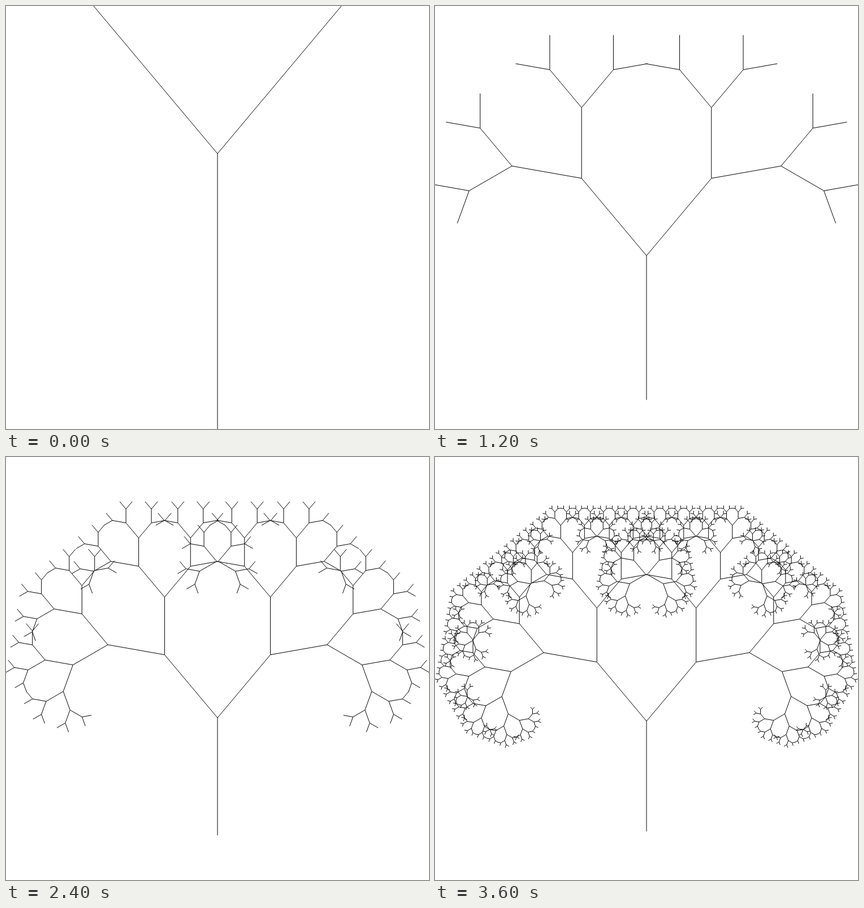
Recreate the animation shown at these times as an HTML page with a canvas. Size 748 by 748 pixels, loop 4 s.

```html
<!DOCTYPE html>
<html lang="en">
<head>
<meta charset="utf-8">
<title>Branching tree</title>
<style>
  html, body { margin: 0; width: 100%; height: 100%; overflow: hidden; background: #fff; }
  canvas { display: block; }
</style>
</head>
<body>
<canvas id="stage" width="748" height="748"></canvas>
<script>
const SIZE = 748, STEP = 400, STEPS = 10;
const RATIO = 0.7, TURN = 40 * Math.PI / 180;
const ctx = document.getElementById('stage').getContext('2d');

// Collects the segments of a unit tree, y pointing up.
function grow(x, y, angle, length, levels, out) {
  if (!levels) return out;
  const x2 = x + length * Math.sin(angle);
  const y2 = y + length * Math.cos(angle);
  out.push([x, y, x2, y2]);
  grow(x2, y2, angle - TURN, length * RATIO, levels - 1, out);
  grow(x2, y2, angle + TURN, length * RATIO, levels - 1, out);
  return out;
}

// Scales the tree to fill the stage and centres it.
function fit(segments) {
  let halfWidth = 0, top = 0, bottom = 0;
  for (const [, , x, y] of segments) {
    halfWidth = Math.max(halfWidth, Math.abs(x));
    top = Math.max(top, y);
    bottom = Math.min(bottom, y);
  }
  const scale = SIZE / Math.max(2 * halfWidth, top - bottom);
  const middle = (top + bottom) / 2;
  const px = x => SIZE / 2 + x * scale;
  const py = y => SIZE / 2 - (y - middle) * scale;
  const path = new Path2D();
  for (const [x1, y1, x2, y2] of segments) {
    path.moveTo(px(x1), py(y1));
    path.lineTo(px(x2), py(y2));
  }
  return path;
}

const trees = Array.from({ length: STEPS }, (_, i) => fit(grow(0, 0, 0, 1, i + 2, [])));

let shown = -1;

function draw() {
  const step = Math.floor(performance.now() / STEP) % STEPS;
  if (step !== shown) {
    shown = step;
    ctx.fillStyle = '#fff';
    ctx.fillRect(0, 0, SIZE, SIZE);
    ctx.strokeStyle = '#000';
    ctx.lineWidth = 1;
    ctx.stroke(trees[step]);
  }
  requestAnimationFrame(draw);
}

draw();
</script>
</body>
</html>
```
